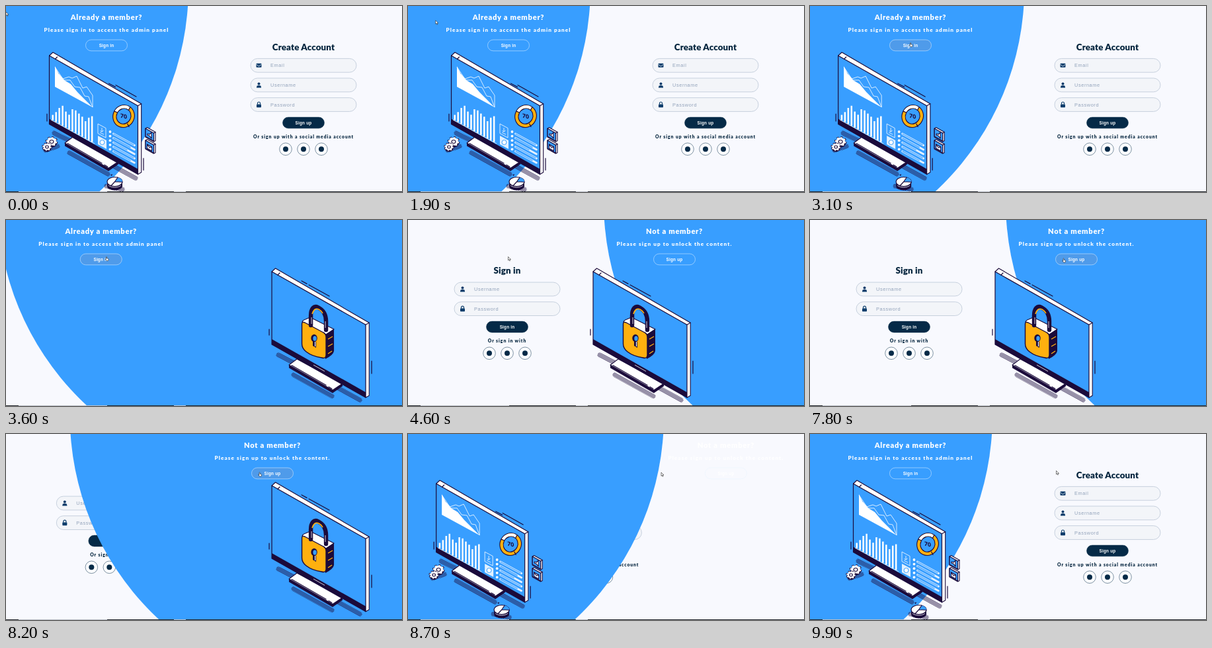
Recreate the animation shown at these times as an HTML page. Size 599x281 px, loop 10 s.

```html
<!DOCTYPE html>
<html lang="en">
<head>
<meta charset="utf-8">
<title>Account forms</title>
<style>
  html, body { margin: 0; width: 100%; height: 100%; overflow: hidden; background: #f8f9fe; }
  svg { display: block; width: 100%; height: 100%; }
  text { text-anchor: middle; }
  .title, .head, .lead, .social { font-family: Lato, "Open Sans", sans-serif; font-weight: 900; }
  .title { font-size: 13.4px; letter-spacing: .1px; fill: #04243d; }
  .head { font-size: 11.2px; letter-spacing: .68px; fill: #fff; }
  .lead { font-size: 8.2px; letter-spacing: 1.08px; fill: #fff; }
  .social { font-size: 6.8px; letter-spacing: .93px; fill: #04243d; }
  .btn, .hint { font-family: "Liberation Sans", Arial, sans-serif; }
  .btn { font-size: 6.4px; font-weight: 700; letter-spacing: .2px; fill: #fff; }
  .hint { font-size: 7.4px; letter-spacing: .58px; fill: #93a3bb; text-anchor: start; }
  .ink { fill: #1b0b3b; }
  .line { fill: none; stroke: #1b0b3b; stroke-width: 1.2; stroke-linecap: round; stroke-linejoin: round; }
  .white { fill: #fff; stroke: #1b0b3b; stroke-width: 1.1; stroke-linejoin: round; }
  .gold { fill: #ffb00f; stroke: #1b0b3b; stroke-width: 1.4; stroke-linejoin: round; }
  .chart { fill: none; stroke: #fff; stroke-width: .8; stroke-linejoin: round; }
  .hatch { fill: none; stroke: url(#hatch); stroke-linecap: round; stroke-width: 7; }
  .hover rect { fill: #4f9bea; }
</style>
</head>
<body>
<svg id="stage" viewBox="0 0 599 281" preserveAspectRatio="none"></svg>
<script>
const BLUE = '#389eff', NAVY = '#052a47';
const LOOP = 10000, STEP = 100, TO_SIGN_IN = 2900, TO_SIGN_UP = 7800;

const path = (cls, d, more = '') => `<path class="${cls}" d="${d}" ${more}/>`;
const text = (cls, x, y, s) => `<text class="${cls}" x="${x}" y="${y}">${s}</text>`;
const group = (id, body) => `<g id="${id}">${body}</g>`;
const repeat = (n, draw) => Array.from({ length: n }, (_, i) => draw(i)).join('');

// ---- Forms and panel texts ----
const icons = {
  mail: `<rect x="-4" y="-3" width="8" height="6" rx="1" fill="#0b3c6b"/>
         <path d="M-4-1.6L0 1.2L4-1.6" fill="none" stroke="#f3f5f9" stroke-width=".8"/>`,
  user: `<circle cy="-2" r="2" fill="#0b3c6b"/><path d="M-3.5 4V3Q-3.5.6-1 .6H1Q3.5.6 3.5 3V4Z" fill="#0b3c6b"/>`,
  lock: `<rect x="-3.5" y="-.6" width="7" height="4.8" rx=".8" fill="#0b3c6b"/>
         <path d="M-2-.4V-2a2 2 0 0 1 4 0V-.4" fill="none" stroke="#0b3c6b" stroke-width="1.2"/>`
};

const field = (cx, y, icon, hint) => `
  <rect x="${cx - 80}" y="${y}" width="160" height="20.8" rx="10.4" fill="#f3f5f9" stroke="#b4c1d2" stroke-width=".7"/>
  <g transform="translate(${cx - 67.5} ${y + 10.4})">${icons[icon]}</g>
  ${text('hint', cx - 50, y + 12.9, hint)}`;

const button = (cx, y, label, fill, stroke) => `
  <rect x="${cx - 31.5}" y="${y}" width="63" height="16.8" rx="8.4" fill="${fill}" stroke="${stroke}" stroke-width=".5"/>
  ${text('btn', cx, y + 10.6, label)}`;

const form = (id, cx, titleY, title, fields, top, action, note) => group(id,
  text('title', cx, titleY, title) +
  fields.map(([icon, hint], i) => field(cx, top + i * 29.6, icon, hint)).join('') +
  button(cx, top + fields.length * 29.6 - .2, action, NAVY, NAVY) +
  text('social', cx, top + fields.length * 29.6 + 32, note) +
  repeat(3, i => {
    const at = `cx="${cx - 27 + i * 27}" cy="${top + fields.length * 29.6 + 48}"`;
    return `<circle ${at} r="9.3" fill="#fbfcff" stroke="${NAVY}" stroke-width=".5"/><circle ${at} r="4" fill="${NAVY}"/>`;
  }));

const intro = (id, cx, head, lead, action) => group(id,
  text('head', cx, 20.7, head) + text('lead', cx, 39.2, lead) + button(cx, 51, action, 'none', '#e6f2ff'));

// ---- Illustrations ----
// Screen seen from the left: (x, y) is its upper left corner, w by h its front.
function monitor(x, y, w, h) {
  const drop = w * .565, r = x + w, b = y + h;
  return path('white', `M${x} ${y}l5.5-5L${r + 5.2} ${y + drop - 3}V${b + drop - 3}L${r} ${b + drop}Z`) +
    `<path d="M${x} ${y}L${r} ${y + drop}V${b + drop}L${x} ${b}Z" fill="${BLUE}"/>` +
    path('ink', `M${x} ${b - 8}L${r} ${b + drop - 8}V${b + drop}L${x} ${b}Z`) +
    path('line', `M${x} ${y}L${r} ${y + drop}V${b + drop}L${x} ${b}Z`, 'stroke-width="1.6"') +
    path('line', `M${r} ${y + drop}l5.2-3M${x + 9} ${y + 5}l3-3`);
}

// Monitor foot with its hatched shadows.
const stand = (x, y) =>
  path('hatch', `M${x - 16} ${y - 15}l24 12M${x + 7} ${y + 15}l58 32M${x + 74} ${y + 35}l33 18`) +
  path('ink', `M${x} ${y}V${y + 4.5}L${x + 66} ${y + 42.5}L${x + 81} ${y + 32}V${y + 28}Z`) +
  path('white', `M${x} ${y}L${x + 12} ${y - 9}L${x + 81} ${y + 28}L${x + 66} ${y + 38}Z`) +
  path('line', `M${x + 4} ${y + .6}l52 30m4 2.3l5 3`, 'stroke-width=".5"');

const gear = (x, y, r) => `<g transform="translate(${x} ${y}) scale(1 .85)">
  <circle r="${r}" cy="2" fill="#1b0b3b" stroke="#1b0b3b" stroke-width="2"/>
  <circle r="${r}" fill="none" stroke="#1b0b3b" stroke-width="4.6" stroke-dasharray="${r * .42} ${r * .365}"/>
  <circle r="${r}" fill="#fff" stroke="#fff" stroke-width="2.6" stroke-dasharray="${r * .36} ${r * .425}"/>
  <circle class="white" r="${r * .42}" fill="${BLUE}"/></g>`;

const cube = (x, y, icon) =>
  path('white', `M${x} ${y}l2.5-1.5l12.5 7v13l-2.5 1.5l-12.5-7Z`) +
  path('line', `M${x} ${y}l12.5 7v12l-12.5-7Z`, `style="fill:${BLUE}"`) +
  path('line', `M${x + 12.5} ${y + 7}l2.5-1.5`) +
  path('white', icon, 'stroke-width=".6"');

function dashboard() {
  const bars = [8, 15, 24, 30, 24, 22, 33, 34, 32, 30, 26, 34, 39];
  return path('hatch', 'M60 218l18-6M152 272l24 5') +
    stand(89, 207) + monitor(65.5, 75, 134, 103.5) +
    path('line', 'M155.5 117l10 5.4M166 119.5l31 17.5M62 163v11M208 230v18') +
    `<path d="M74 91L80 103L88 112L98 118L108 130L118 140L131 153L74 122Z" fill="#fff"/>` +
    path('chart', 'M74 92L86 110L95 107L100 109L107 106L116 124L122 122L131 135V153M80 103L88 112L97 112L104 122L112 123L119 136L125 137L131 153') +
    bars.map((h, i) => `<rect x="${69.5 + i * 4.95}" y="${172.5 + i * 2.75 - h}" width="2.5" height="${h}" fill="#fff"/>`).join('') +
    path('chart', 'M68 172L134 208') +
    `<g transform="translate(178 166.5) rotate(25)">
      <ellipse rx="13.5" ry="14.5" fill="none" stroke="#1b0b3b" stroke-width="6.4"/>
      <ellipse rx="13.5" ry="14.5" fill="none" stroke="#ffb00f" stroke-width="4.2"/>
      <path d="M-13.5-1A13.5 14.5 0 0 1 3-14.1" fill="none" stroke="#fff" stroke-width="4.2"/>
      <path class="line" d="M-16-1h5M3-16.5v5M10 8l4 3"/></g>
     <text class="ink" transform="translate(178 169.5) skewY(12)" font-family="Lato, sans-serif" font-size="8.5" font-weight="900">70</text>` +
    path('chart', 'M139 178L151 184.5V199L139 192.5ZM145 184v6l-2.5-1.5M145 190l2.5-2M142 191l6 3') +
    `<path d="M139 196L152 203V216L139 209Z" fill="#fff" opacity=".85"/>
     <circle cx="145.5" cy="206" r="3.5" fill="#fff" stroke="${BLUE}"/>` +
    repeat(5, i => `<g transform="translate(157.5 ${190 + i * 6.6})">
      <circle r="1.9" fill="#fff"/><path d="M5 3L37 20.5" stroke="#e6f2ff" stroke-width="2.8" stroke-linecap="round"/>
      <path d="M5 3L${36 - i % 3 * 5} ${20 - i % 3 * 2.7}" stroke="${BLUE}" stroke-width="1.2"/></g>`) +
    cube(211, 185, 'M214 193l3 1l3-3v9l-3-4l-3-1Z') + cube(211, 203, 'M213.5 209l7 4v6l-7-4Z') +
    path('line', 'M213.5 209l3.5 5l3.5-1', 'stroke-width=".6"') +
    gear(69, 205, 7) + gear(62, 213, 5.5) +
    path('ink', 'M153 266v6a11.5 6.5 0 0 0 23 0v-6Z') +
    path('chart', 'M155 271a11.5 6.5 0 0 0 19 0', 'stroke-width="2"') +
    `<ellipse class="white" cx="164.5" cy="265.5" rx="11.5" ry="7"/>` +
    `<path d="M164.5 265.5L169 259A11.5 7 0 0 1 176 266Z" fill="${BLUE}"/>` +
    path('line', 'M169 259L164.5 265.5L176 266M164.5 265.5L159 271.5') +
    path('ink', 'M158 255l3-1l-1 3Z');
}

function padlock() {
  const shackle = 'M339 159V145C339 133 344 129 350 132C358 136 362 144 362 153V166';
  return path('white', 'M326 154Q327 151 331 150L338 147L374 165L362 173Z') +
    path('ink', 'M361 173L374 165V198Q373 204 361 210Z') +
    path('gold', 'M325.5 157Q325.5 153 330 155L358 170Q362 172 362 177V204Q362 210 355 208Q341 206 332 199Q325.5 194 325.5 187Z', 'stroke-width="2"') +
    `<path d="M365 180L372 176M365 191L372 187M365 202L371 198" stroke="#ffb00f" stroke-width="1.4"/>
     <path d="${shackle}" fill="none" stroke="#1b0b3b" stroke-width="6.4" stroke-linecap="round"/>
     <path d="M341 142Q344 132 351 135Q355 137 357 141" fill="none" stroke="#ffb00f" stroke-width="1.6"/>
     <path d="M340 157V147M361 163V153" stroke="#fff" stroke-width=".8"/>
     <ellipse cx="344" cy="178.5" rx="4.7" ry="5.8" fill="#1b0b3b"/>
     <path d="M342 182L347 184V193L342 190Z" fill="#1b0b3b"/>
     <ellipse cx="345" cy="179" rx="2.7" ry="3.7" fill="${BLUE}"/>
     <path d="M345.5 184v7" stroke="#fff" stroke-width="1.2"/>`;
}

const vault = () =>
  stand(306, 219) + monitor(280, 78, 142, 110) +
  path('line', 'M325 92l8 4.4M336 98l31 17M276 165v9M431 213v19') +
  path('chart', 'M343 219l17 9.6') + padlock();

// ---- Scene ----
const stage = document.getElementById('stage');
stage.innerHTML = `
  <defs><pattern id="hatch" width="1.8" height="1.8" patternUnits="userSpaceOnUse" patternTransform="rotate(29)">
    <path d="M0 .5H1.8" stroke="#1b0b3b" stroke-width=".8"/></pattern></defs>
  <rect width="599" height="281" fill="#f8f9fe"/>` +
  form('signUp', 450, 66.6, 'Create Account', [['mail', 'Email'], ['user', 'Username'], ['lock', 'Password']],
    79.4, 'Sign up', 'Or sign up with a social media account') +
  form('signIn', 150, 81.3, 'Sign in', [['user', 'Username'], ['lock', 'Password']], 94.1, 'Sign in', 'Or sign in with') +
  `<circle id="disc" cy="-28" r="420" fill="${BLUE}"/>` +
  group('leftArt', dashboard()) + group('rightArt', vault()) +
  intro('leftText', 152, 'Already a member?', 'Please sign in to access the admin panel', 'Sign in') +
  intro('rightText', 403, 'Not a member?', 'Please sign up to unlock the content.', 'Sign up') +
  `<path d="M0 280.5H599" stroke="#20242b"/><path d="M19 280.5H153M254 280.5H272" stroke="#b8bcc4"/>
  <g id="cursor" stroke="#222" stroke-width=".6" stroke-linejoin="round" fill="#fff">
    <path id="arrow" d="M0 0V5.4L1.3 4.3L2.2 6.3L3 5.9L2.2 4H4Z"/>
    <path id="hand" d="M0 .4Q.6-.4 1.2.4V2.4L3.2 3Q3.8 3.2 3.6 4L3 6H.6L-1.2 3.6L0 3.8Z"/>
  </g>`;
const part = Object.fromEntries([...stage.querySelectorAll('[id]')].map(e => [e.id, e]));

// ---- Motion ----
const clamp = v => Math.min(1, Math.max(0, v));

// cubic-bezier(.42, 0, .58, 1)
function easeInOut(v) {
  if (v <= 0 || v >= 1) return clamp(v);
  let lo = 0, hi = 1, u;
  for (let i = 0; i < 20; i++) {
    u = (lo + hi) / 2;
    const x = 1.26 * u * (1 - u) ** 2 + 1.74 * u * u * (1 - u) + u ** 3;
    if (x < v) lo = u; else hi = u;
  }
  return u * u * (3 - 2 * u);
}

// 0 with the sign-up form shown, 1 with the sign-in form shown
const turn = (t, delay, length) =>
  easeInOut((t - TO_SIGN_IN - delay) / length) - easeInOut((t - TO_SIGN_UP - delay) / length);

// start, end, target x, target y
const moves = [[1500, 2600, 151.5, 55.5], [5800, 6700, 362, 52.5], [6700, 7000, 383, 58], [9800, 9900, 372.5, 55.5]];
function pointer(t) {
  let x = 0, y = 9;
  for (const [start, end, toX, toY] of moves) {
    const k = easeInOut((t - start) / (end - start));
    x += (toX - x) * k;
    y += (toY - y) * k;
  }
  return [x, y];
}

const place = (el, x, y = 0) => el.setAttribute('transform', `translate(${x} ${y})`);

function draw() {
  const t = Math.floor(performance.now() % LOOP / STEP) * STEP;
  const art = turn(t, 0, 1100), words = turn(t, 600, 900), forms = turn(t, 250, 1450), swap = turn(t, 700, 200);
  part.disc.setAttribute('cx', -144 + 860 * turn(t, 0, 1200));
  place(part.leftArt, -340 * art);
  place(part.rightArt, 443 * (1 - art));
  place(part.leftText, -336 * words);
  place(part.rightText, 336 * (1 - words));
  place(part.signUp, -300 * forms);
  place(part.signIn, 300 * (1 - forms));
  part.signUp.setAttribute('opacity', 1 - swap);
  part.signIn.setAttribute('opacity', swap);
  place(part.cursor, ...pointer(t));
  const overLeft = t >= 2500 && t < 3750, overRight = t >= 6900 && t < 8550;
  part.leftText.classList.toggle('hover', overLeft);
  part.rightText.classList.toggle('hover', overRight);
  part.hand.setAttribute('visibility', overLeft || overRight ? 'visible' : 'hidden');
  part.arrow.setAttribute('visibility', overLeft || overRight ? 'hidden' : 'visible');
  requestAnimationFrame(draw);
}
draw();
</script>
</body>
</html>
```
